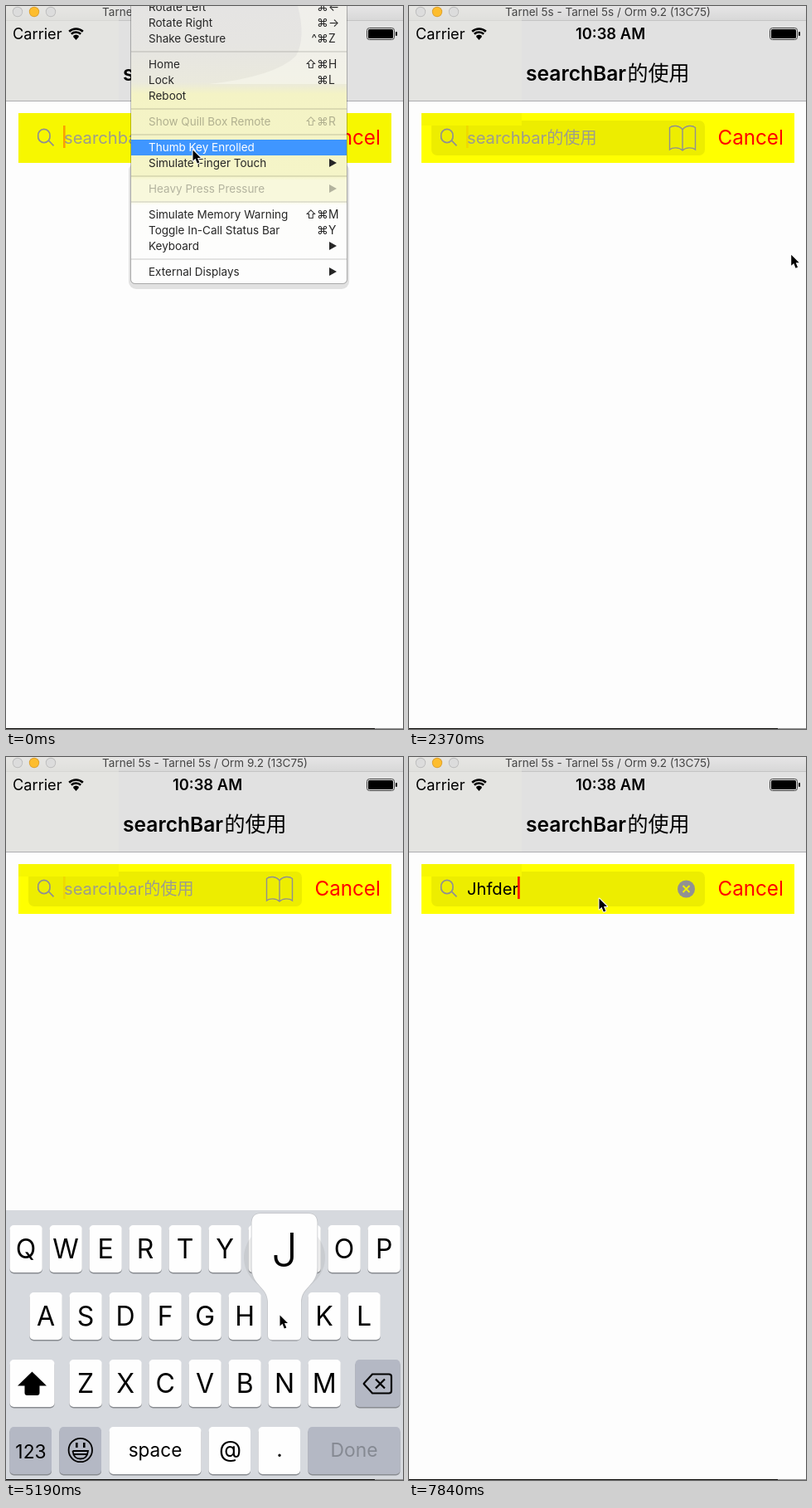
An HTML page with a canvas that plays this animation: 479x871 px, repeating every 7.99 s.

```html
<!DOCTYPE html>
<html lang="en">
<head>
<meta charset="utf-8">
<title>Search bar demo</title>
<style>
html, body { margin: 0; width: 100%; height: 100%; overflow: hidden; background: #fdfdfd; }
canvas { display: block; }
</style>
</head>
<body>
<canvas id="stage" width="479" height="871"></canvas>
<script>
const ctx = document.getElementById('stage').getContext('2d');
const LOOP = 7990, TICK = 148, LAST = 53;
const GRAY = '#8f8f92', KEY_GRAY = '#b4b8c4', BLUE = '#3f96ff';
const WORD = 'Jhfder', TYPED_AT = [36, 38, 39, 40, 41, 43];
const POPUPS = { 35: 'J', 38: 'h', 39: 'f', 40: 'd', 41: 'e', 43: 'r' };
const MENU_END = 14, EDIT_END = 47;

// Pointer path: tick, x, y
const PATH = [
  [0, 225, 173], [1, 226, 181], [5, 228, 283], [6, 240, 286], [8, 395, 286],
  [9, 430, 288], [10, 460, 306], [11, 485, 325], [14, 485, 325], [19, 416, 252],
  [20, 416, 252], [25, 135, 161], [29, 135, 161], [35, 330, 672], [36, 330, 672],
  [38, 284, 674], [39, 196, 674], [40, 148, 672], [41, 138, 611], [43, 166, 606],
  [45, 411, 830], [48, 411, 830], [52, 229, 170], [53, 229, 170]
];

// label, shortcut ('>' opens a submenu), disabled; null is a separator
const MENU = [
  ['Rotate Left', ' ⌘←'], ['Rotate Right', ' ⌘→'], ['Shake Gesture', '^⌘Z'], null,
  ['Home', '⇧⌘H'], ['Lock', ' ⌘L'], ['Reboot', ''], null,
  ['Show Quill Box Remote', '⇧⌘R', true], null,
  ['Thumb Key Enrolled', ''], ['Simulate Finger Touch', '>'], null,
  ['Heavy Press Pressure', '>', true], null,
  ['Simulate Memory Warning', '⇧⌘M'], ['Toggle In-Call Status Bar', ' ⌘Y'], ['Keyboard', '>'], null,
  ['External Displays', '>']
];
const SUBMENU = ['Uses the Same Layout', 'Connect Hardware Keyboard', 'Toggle Software Keyboard'];
const ROWS = [['QWERTYUIOP', 4.5, 18], ['ASDFGHJKL', 28.5, 99], ['ZXCVBNM', 76.5, 180]];

function text(s, x, y, size, color = '#000', weight = 400, align = 'left') {
  ctx.font = `${weight} ${size}px Inter, "Noto Sans CJK SC", "Noto Sans CJK", "DejaVu Sans", sans-serif`;
  ctx.textAlign = align;
  ctx.fillStyle = color;
  ctx.fillText(s, x, y);
}
function rect(x, y, w, h, color) {
  ctx.fillStyle = color;
  ctx.fillRect(x, y, w, h);
}
function round(x, y, w, h, r, color) {
  ctx.beginPath();
  ctx.roundRect(x, y, w, h, r);
  ctx.fillStyle = color;
  ctx.fill();
}
function disc(x, y, r, color) {
  ctx.beginPath();
  ctx.arc(x, y, r, 0, 7);
  ctx.fillStyle = color;
  ctx.fill();
}
function shape(d, fill, stroke, width = 2) {
  const p = new Path2D(d);
  if (stroke) {
    ctx.strokeStyle = stroke;
    ctx.lineWidth = width;
    ctx.stroke(p);
  }
  if (fill) {
    ctx.fillStyle = fill;
    ctx.fill(p);
  }
}

function pointerAt(n) {
  const i = Math.max(1, PATH.findIndex(p => p[0] >= n));
  const [a, ax, ay] = PATH[i - 1], [b, bx, by] = PATH[i];
  let u = (n - a) / (b - a);
  if (b - a > 2) u = u * u * (3 - 2 * u);
  return [ax + (bx - ax) * u, ay + (by - ay) * u];
}

// Share of the way still to go, ms after the start of a critically damped spring
function spring(ms) {
  const x = Math.max(0, ms) * 0.01826;
  return (1 + x) * Math.exp(-x);
}
function keyboardTop(n) {
  const t = n * TICK;
  const hidden = n < EDIT_END ? spring(t - 2487) : 1 - spring(t - 6941);
  return 546 + 325 * hidden;
}
function caretAlpha(n) {
  if (n >= TYPED_AT[0]) return 1;
  const p = (n * TICK + 12) % 1000;
  return p < 100 ? 0.35 : p < 500 ? 0.08 : 1;
}

function drawHeader() {
  rect(0, 0, 479, 114, '#e1e1e1');
  const g = ctx.createLinearGradient(0, 0, 0, 17);
  g.addColorStop(0, '#e6e5e6');
  g.addColorStop(1, '#d8d8d8');
  rect(0, 0, 479, 17, g);
  rect(0, 17, 479, 1, '#c4c4c4');
  rect(0, 0, 136, 114, 'rgba(232,231,226,.55)');
  rect(0, 114, 479, 1, '#adadb0');
  ['#cfcfcf', '#fdbd2e', '#cfcfcf'].forEach((c, i) => {
    disc(14 + 20 * i, 7, 6.2, i === 1 ? '#dca030' : '#bcbcbc');
    disc(14 + 20 * i, 7, 5.3, i === 1 ? c : '#dcdcdc');
  });
  text('Tarnel 5s - Tarnel 5s / Orm 9.2 (13C75)', 240, 12, 13.5, '#444', 400, 'center');

  text('Carrier', 8, 40, 18.2);
  for (const r of [5, 9.5, 13.5]) {
    ctx.beginPath();
    ctx.arc(84.5, 40, r - 1, -2.3, -0.84);
    ctx.lineWidth = 2.6;
    ctx.strokeStyle = '#000';
    ctx.stroke();
  }
  shape('M84.5 41L81 37Q84.5 34 88 37Z', '#000');
  text('10:38 AM', 243, 40, 18.4, '#000', 600, 'center');
  ctx.beginPath();
  ctx.roundRect(435.5, 26.5, 33, 14, 3);
  ctx.lineWidth = 1;
  ctx.strokeStyle = '#444';
  ctx.stroke();
  round(437, 28, 30, 11, 1.5, '#000');
  round(470, 31, 2, 5, 1, '#000');
  text('searchBar', 141, 90, 24.6, '#000', 600);
  text('的使用', 263.5, 90, 25, '#000', 500);
}

function drawSearchBar(n, value, editing) {
  const fresh = n >= MENU_END;
  rect(15, 129, 450, 60, '#f7f700');
  if (n > 0) {
    ctx.save();
    ctx.beginPath();
    if (fresh) {
      ctx.rect(136, 129, 329, 15);
      ctx.rect(15, 144, 450, 45);
    } else {
      ctx.rect(69, 144, 396, 45);
    }
    ctx.clip();
    rect(15, 129, 450, 60, '#ff0');
    round(27, 138, 330, 42, 7, '#eded00');
    ctx.restore();
  }

  shape('M53 156.500A7.200 7.200 0 1 1 38.700 156.500A7.200 7.200 0 1 1 53 156.500M51 161.700L57.500 168.300', null, GRAY, 1.7);
  if (value && editing) {
    disc(334.5, 159, 10.5, '#919193');
    shape('M330.500 155l8 8M338.500 155l-8 8', null, '#eded00', 2);
  } else {
    shape('M330 149C326 143.500 318 143.500 314.500 146.500V173C318 170 326 170 330 174C334 170 342 170 345.500 173V146.500C342 143.500 334 143.500 330 149V174', null, GRAY, 1.4);
  }
  text(value || 'searchbar的使用', 70, 166, 20.2, value ? '#000' : '#9d9d8c');
  if (editing) {
    const x = 69 + (value ? ctx.measureText(value).width : 0);
    ctx.globalAlpha = caretAlpha(n);
    rect(x, 144, 2.6, 27, '#f00');
    ctx.globalAlpha = 1;
  }
  text('Cancel', 372.5, 166.5, 24.2, editing ? '#f00' : '#cfcf10');
}

function key(x, y, w, color = '#fefefe') {
  round(x, y + 1.5, w, 57, 5, '#898c91');
  round(x, y, w, 57, 5, color);
}

function drawPopup(x, y, letter) {
  const c = x + 19.5;
  ctx.beginPath();
  ctx.ellipse(c, y - 42, 49, 43, 0, 0, 7);
  ctx.fillStyle = 'rgba(120,120,120,.13)';
  ctx.fill();
  ctx.save();
  ctx.translate(c, y);
  shape('M-39.500 -84Q-39 -95 -29 -95H29Q39 -95 39.500 -84V-30C39.500 -8 20 -7 20 12V52Q20 57 15 57H-15Q-20 57 -20 52V12C-20 -7 -39.500 -8 -39.500 -30Z', '#fefefe', '#c3c5c9', 1.5);
  ctx.restore();
  text(letter, c, y - 31, 56, '#000', 300, 'center');
}

function drawKeyboard(n, value) {
  const top = keyboardTop(n);
  if (top > 870) return;
  const upper = n < TYPED_AT[0], pressed = POPUPS[n];
  let popup;
  ctx.save();
  ctx.translate(0, top);
  rect(0, 0, 479, 330, '#d6d9de');
  for (const [letters, x0, y] of ROWS) {
    [...letters].forEach((ch, i) => {
      const x = x0 + 48 * i, label = upper ? ch : ch.toLowerCase();
      key(x, y, 39.3);
      if (label === pressed) popup = [x, y, label];
      else if (upper) text(label, x + 19.6, y + 40, 32, '#000', 400, 'center');
      else text(label, x + 19.6, y + 37.5, 34.5, '#000', 300, 'center');
    });
  }

  key(4.5, 180, 54, upper ? '#fefefe' : KEY_GRAY);
  shape('M31.500 196L46.500 210.500H39.500V220Q39.500 222 37.500 222H25.500Q23.500 222 23.500 220V210.500H16.500Z', upper ? '#000' : null, '#000', 2);
  key(421.5, 180, 54, KEY_GRAY);
  shape('M442 197.500H462Q465 197.500 465 200.500V217.500Q465 220.500 462 220.500H442L432 209.500Q431.500 209 432 208.500ZM446 203.500l11 11M457 203.500l-11 11', null, '#000', 2.2);

  key(4.5, 261, 50.5, KEY_GRAY);
  text('123', 30, 298.5, 22.8, '#000', 400, 'center');
  key(64.5, 261, 50.5, KEY_GRAY);
  shape('M104 289A14.200 14.200 0 1 1 75.600 289A14.200 14.200 0 1 1 104 289M80.500 290H99Q98 299.500 89.800 299.500T80.500 290M82 294H97.500', null, '#000', 1.8);
  shape('M84 280h2.600v6h-2.600zM93 280h2.600v6h-2.600z', '#000');
  key(124.5, 261, 111);
  text('space', 180, 296.5, 22.6, '#000', 400, 'center');
  key(244.5, 261, 50.5);
  text('@', 270.5, 298, 28, '#000', 400, 'center');
  key(304.5, 261, 50.5);
  text('.', 330, 297, 26, '#000', 400, 'center');
  const down = n === EDIT_END - 1;
  key(364.5, 261, 111, !value ? KEY_GRAY : down ? '#fefefe' : '#0885ff');
  text('Done', 420, 297, 22.8, !value ? '#858992' : down ? '#000' : '#fff', 400, 'center');
  if (popup) drawPopup(...popup);
  ctx.restore();
}

function triangle(y, color) {
  shape(`M390 ${y - 5}L399 ${y}L390 ${y + 5}Z`, color);
}

function drawMenu(n, px, py) {
  const open = n >= 6;
  round(148, 189, 266, 152, 9, 'rgba(0,0,0,.11)');
  const g = ctx.createLinearGradient(0, 0, 0, 335);
  const low = n ? '#f8f8f6' : '#f8f8dc';
  [[0, '#e5e4e3'], [45, '#e6e5e2'], [92, '#eae9dd'], [106, '#f4f3c5'], [205, '#f5f5c8'],
   [210, low], [234, low], [240, '#fdfdfb'], [335, '#fdfdfd']]
    .forEach(([y, c]) => g.addColorStop(y / 335, c));
  round(151, -10, 260, 344, 5, g);
  shape('M411 0H352Q362 38 350 60Q325 85 245 94H411Z', 'rgba(255,255,244,.4)');
  ctx.beginPath();
  ctx.roundRect(150.5, -10, 261, 344.5, 5);
  ctx.lineWidth = 1;
  ctx.strokeStyle = 'rgba(0,0,0,.25)';
  ctx.stroke();

  let y = 1;
  for (const item of MENU) {
    if (!item) {
      rect(151, y - 4, 260, 2, 'rgba(0,0,0,.1)');
      y += 12;
      continue;
    }
    const [label, keys, off] = item;
    const lit = open ? label === 'Keyboard' : !off && py >= y - 9 && py < y + 10;
    const color = lit ? '#fff' : off ? 'rgba(0,0,0,.28)' : '#262626';
    if (lit) rect(151, y - 9, 260, 19, BLUE);
    text(label, 172, y + 5, 13.5, color);
    if (keys === '>') {
      triangle(y, color);
    } else if (keys) {
      text(keys[0], 375, y + 5, 13.8, color, 400, 'right');
      text(keys[1], 375, y + 5, 13.8, color);
      text(keys[2], 389, y + 5, 13.8, color);
    }
    y += 19;
  }

  if (!open) return;
  round(412, 275, 90, 71, 5, 'rgba(0,0,0,.16)');
  round(410.5, 275, 90, 67, 5, '#bbb');
  round(411.5, 276, 90, 65, 4, '#f8f8f8');
  SUBMENU.forEach((label, i) => {
    const y = 289 + 19 * i;
    const lit = n < 13 && px > 411 && py >= y - 9 && py < y + 10;
    const color = lit ? '#fff' : '#262626';
    if (lit) rect(411, y - 9, 68, 19, BLUE);
    if (i < 2) shape(`M418 ${y}l3 4.500l6 -9`, null, color, 1.9);
    text(label, 432, y + 5, 13.5, color);
  });
}

function drawPointer(x, y) {
  ctx.save();
  ctx.translate(x, y);
  ctx.lineJoin = 'round';
  shape('M0.500 0.500V13.500L3.500 10.800L5.800 16.500L8.300 15.500L6 10H10Z', '#000', '#fff', 2);
  ctx.restore();
}

function draw(n) {
  const editing = n < EDIT_END || n === LAST;
  const value = WORD.slice(0, TYPED_AT.filter(k => k <= n).length);
  const [px, py] = pointerAt(n);
  const menu = n < MENU_END;
  rect(0, 0, 479, 871, '#fdfdfd');
  if (menu && n > 0) rect(69, 144, 410, 215, '#f9f9f8');
  drawHeader();
  drawSearchBar(n, value, editing);
  drawKeyboard(n, value);
  if (menu) drawMenu(n, px, py);
  drawPointer(px, py);
  rect(0, 870, 445, 1, '#0c0a08');
  rect(445, 870, 34, 1, '#8c8c8c');
}

function frame(now) {
  const t = now % LOOP;
  draw(Math.min(LAST, Math.floor((t + 20) / TICK)));
  requestAnimationFrame(frame);
}
requestAnimationFrame(frame);
</script>
</body>
</html>
```
